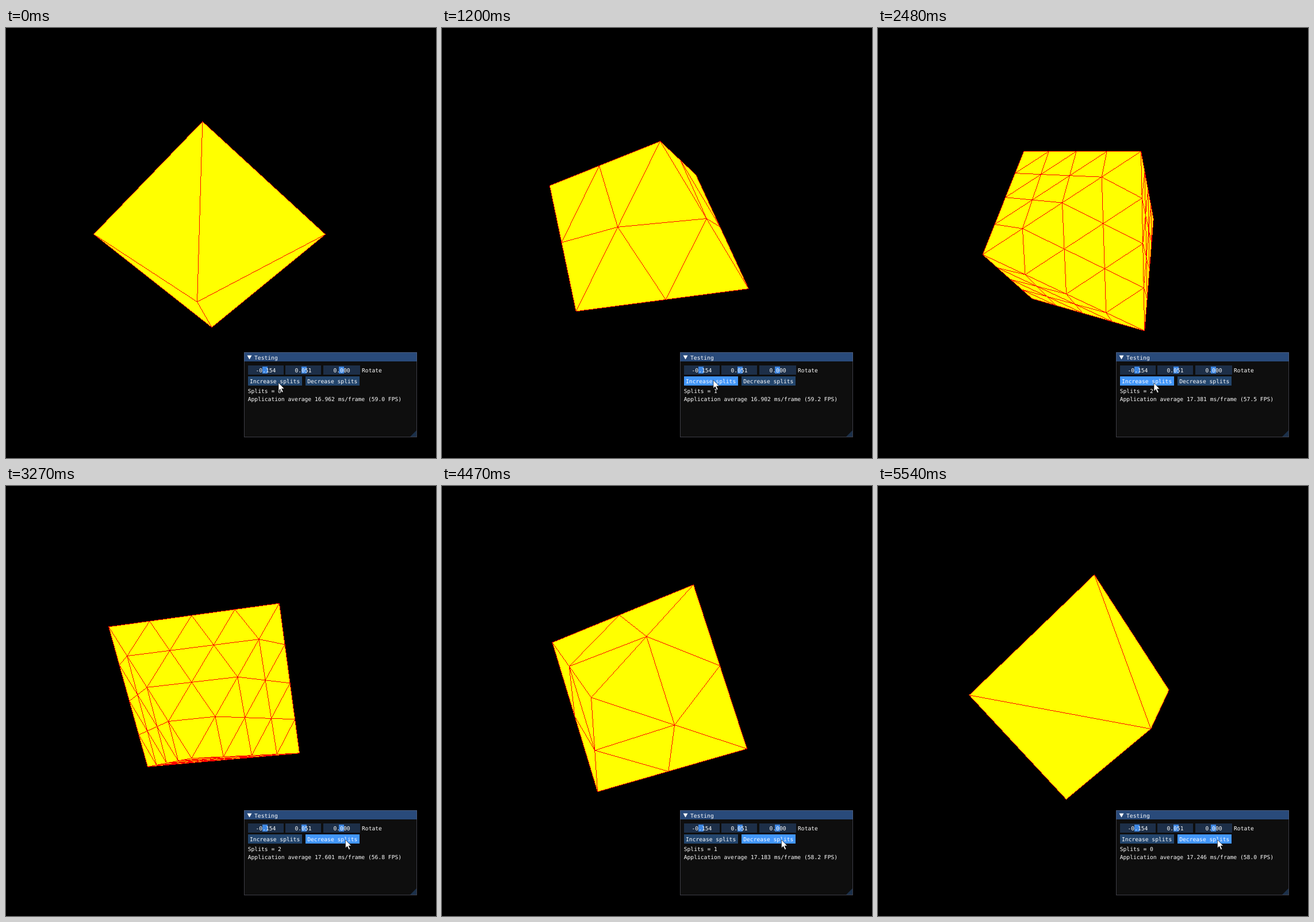
Recreate the animation shown at these times as an HTML page with a canvas. Size 748 by 748 pixels, loop 5590 ms.

```html
<!DOCTYPE html>
<html lang="en">
<head>
<meta charset="utf-8">
<title>Octahedron splits</title>
<style>
  html, body { margin: 0; width: 100%; height: 100%; overflow: hidden; background: #000; }
  svg, canvas { position: absolute; left: 0; top: 0; }
  rect { shape-rendering: crispEdges; }
  text {
    font: 9.66px "DejaVu Sans Mono", "Liberation Mono", monospace;
    fill: #fff; white-space: pre; text-rendering: geometricPrecision;
  }
  .mid { text-anchor: middle; }
  .frame { fill: #1d2f48; }
  .grab { fill: #3d85e0; }
</style>
</head>
<body>
<svg width="748" height="748">
  <path id="faces" fill="#ff0" shape-rendering="crispEdges"/>
</svg>
<canvas id="wires" width="748" height="748"></canvas>
<svg width="748" height="748">
  <g id="panel">
    <rect x="414" y="564" width="301" height="148" fill="#0e0e0e"/>
    <rect x="414" y="564" width="301" height="16" fill="#294a7a"/>
    <rect x="414.5" y="564.5" width="300" height="147" fill="none" stroke="#6e6e80" stroke-opacity=".5"/>
    <path d="M419.5 569.5h8l-4 7z" fill="#fff"/>
    <path d="M714 700v11h-11z" fill="#1b304a"/>
    <text x="432" y="576.5">Testing</text>
    <text x="619" y="598.5">Rotate</text>
    <rect id="increase" x="421" y="606" width="94" height="16"/>
    <rect id="decrease" x="521" y="606" width="94" height="16"/>
    <text x="424" y="618">Increase splits</text>
    <text x="524.2" y="618">Decrease splits</text>
    <text id="splits" x="420.7" y="634.5"></text>
    <text id="average" x="420.7" y="648.5"></text>
  </g>
  <path id="cursor" d="M0 0V14.2L3.2 11.2L5.9 17L8.2 16L5.6 10.4H10.2Z" fill="#fff" stroke="#000" stroke-width=".6"/>
</svg>
<script>
const LOOP = 5590, STEP = 46.17;
const CENTER = [350.7, 358.9], SCALE = 202.2, DISTANCE = 5;

// Spin axis, and two unit vectors that turn around it (x right, y up, z to the viewer).
const AXIS = [0.2756, 0.8327, 0.4804];
const SIDE = [0.0639, 0.4823, -0.8737];
const CROSS = [-0.9592, 0.2715, 0.0797];
const ROTATE = [0.9493, 0.3144];
const START_ANGLE = -0.6, TICK_ANGLE = 0.93;

// Keys are [step, value...].
const TICKS = [[0, 0], [26, 72], [44, 118], [54, 146], [71, 191], [97, 263], [120, 325]];
const FRAME_MS = [[0, 16.962], [26, 16.902], [44, 17.371], [54, 17.381], [71, 17.601], [97, 17.183], [120, 17.246]];
const POINTER = [[0, 474, 617], [6, 472, 612.5], [53, 472, 612.5], [54, 480, 617.5], [56, 486, 618], [64, 590.5, 615.5], [120, 590.5, 615.5]];
const CLICKS = [[14, 1], [34, 1], [78, -1], [108, -1]];

const el = id => document.getElementById(id);
const wires = el("wires").getContext("2d");
wires.fillStyle = "#f00";

function interpolate(keys, step) {
  let k = 1;
  while (k < keys.length - 1 && keys[k][0] < step) k++;
  const [s0, ...from] = keys[k - 1], [s1, ...to] = keys[k];
  const u = Math.min(1, (step - s0) / (s1 - s0));
  return from.map((v, i) => v + (to[i] - v) * u);
}

const combine = (a, p, b, q) => p.map((v, i) => a * v + b * q[i]);
const mix = (p, q, u) => combine(1 - u, p, u, q);

function project([x, y, z]) {
  const k = SCALE / (1 - z / DISTANCE);
  return [CENTER[0] + x * k, CENTER[1] - y * k];
}

// Hard one-pixel line: one pixel for each row or column along the longer side.
function drawLine(from, to) {
  const [start, end] = [project(from), project(to)];
  const delta = combine(1, end, -1, start);
  const major = Math.abs(delta[0]) > Math.abs(delta[1]) ? 0 : 1;
  const low = Math.floor(Math.min(start[major], end[major]));
  const high = Math.floor(Math.max(start[major], end[major]));
  for (let p = low; p <= high; p++) {
    const u = Math.min(1, Math.max(0, (p + 0.5 - start[major]) / (delta[major] || 1)));
    const q = Math.floor(start[1 - major] + delta[1 - major] * u);
    if (major) wires.fillRect(q, p, 1, 1);
    else wires.fillRect(p, q, 1, 1);
  }
}

function bodyAxes(degrees) {
  const angle = degrees * Math.PI / 180, c = Math.cos(angle), s = Math.sin(angle);
  const q = combine(c, SIDE, s, CROSS), m = combine(-s, SIDE, c, CROSS);
  const [a, b] = ROTATE;
  return [combine(a, AXIS, b, m), q, combine(-b, AXIS, a, m)];
}

// A face is the plane where the dot product with the sum of its corners is 1.
const facesViewer = corners => corners.reduce((sum, v) => sum + v[2], 0) * DISTANCE > 1;

function drawSolid(degrees, splits) {
  const axes = bodyAxes(degrees), parts = 2 ** splits;
  let faces = "";
  wires.clearRect(0, 0, 748, 748);
  for (let bits = 0; bits < 8; bits++) {
    const corners = axes.map((v, i) => v.map(n => bits >> i & 1 ? -n : n));
    if (!facesViewer(corners)) continue;
    faces += `M${corners.map(project).join("L")}Z`;
    for (let i = 0; i < 3; i++) {
      const [a, b, c] = [0, 1, 2].map(j => corners[(i + j) % 3]);
      for (let n = 1; n <= parts; n++) drawLine(mix(a, b, n / parts), mix(a, c, n / parts));
    }
  }
  el("faces").setAttribute("d", faces);
}

function drawPanel(step, splits) {
  const [x, y] = interpolate(POINTER, step);
  const [ms] = interpolate(FRAME_MS, step);
  const paint = (id, hovered) => el(id).setAttribute("fill", hovered ? "#4296fa" : "#23456c");
  paint("increase", step > 0 && x < 514);
  paint("decrease", x > 521 && x < 615);
  el("splits").textContent = `Splits = ${splits}`;
  el("average").textContent =
    `Application average ${ms.toFixed(3)} ms/frame (${(1000 / ms).toFixed(1)} FPS)`;
  el("cursor").setAttribute("transform", `translate(${x} ${y})`);
}

function addField(x, width, grabX, value) {
  el("panel").insertAdjacentHTML("beforeend",
    `<rect class="frame" x="${x}" y="587" width="${width}" height="16"/>
     <rect class="grab" x="${grabX}" y="589" width="9" height="12"/>
     <text class="mid" x="${x + width / 2}" y="598.5">${value}</text>`);
}

function render(time) {
  const step = Math.min(120, Math.floor((time % LOOP + 14) / STEP));
  const splits = CLICKS.reduce((n, [at, change]) => n + (step >= at ? change : 0), 0);
  const ticks = Math.round(interpolate(TICKS, step)[0]);
  drawSolid(START_ANGLE + TICK_ANGLE * ticks, splits);
  drawPanel(step, splits);
}

addField(421, 62, 446, "-0.154");
addField(486, 62, 514, "0.051");
addField(552, 64, 579, "0.000");

const begin = performance.now();
function tick() {
  render(performance.now() - begin);
  requestAnimationFrame(tick);
}
tick();
</script>
</body>
</html>
```
